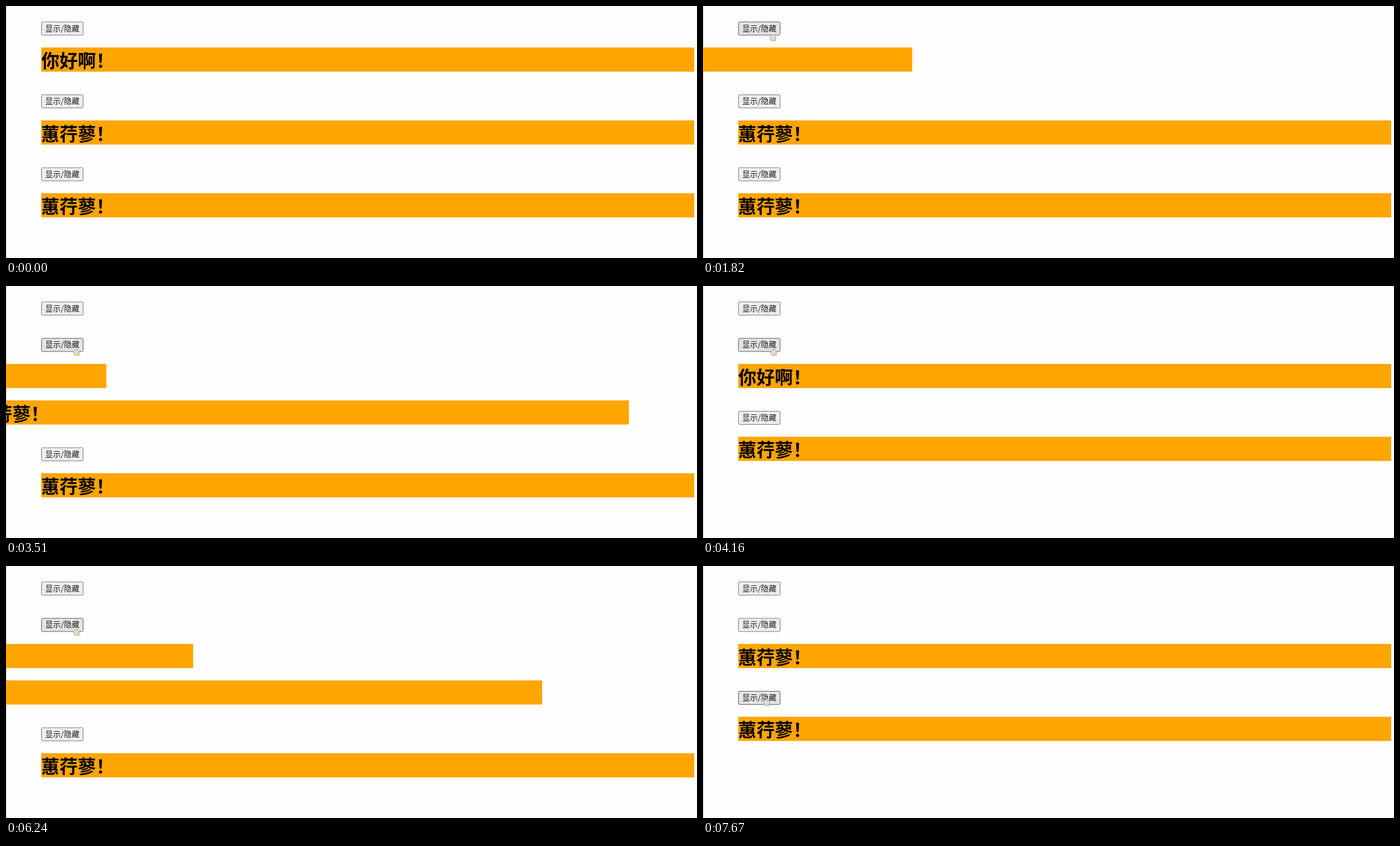
Animation of 1000x365 px, one loop 8 s. Source, as an HTML page:

```html
<!DOCTYPE html>
<html lang="zh-CN">
<head>
<meta charset="utf-8">
<title>显示/隐藏</title>
<style>
  html, body { margin: 0; width: 100%; height: 100%; overflow: hidden; background: #fefefe; }
  #stage {
    position: relative; width: 1000px; height: 365px; overflow: hidden;
    font-family: "Noto Sans CJK SC", "Noto Sans CJK", "Noto Sans CJK JP", sans-serif;
    color: #000;
  }
  #stage > * { position: absolute; left: 0; top: 0; box-sizing: border-box; }
  .button {
    width: 61px; height: 19.5px; border: 1px solid #8a8a8a; border-radius: 2px;
    background: #efefef; color: #1c1c1c; font-size: 11.3px; line-height: 17px;
    text-align: center; white-space: nowrap;
  }
  .button.hover { background: #e5e5e5; border-color: #707070; }
  .bar {
    width: 945.3px; height: 35.4px; background: #ffa500;
    font-size: 26.4px; font-weight: 700; line-height: 35px; white-space: nowrap;
  }
  #edge { width: 1px; height: 365px; background: #d9d9d9; }
  #cursor { width: 15px; height: 16px; }
</style>
</head>
<body>
<div id="stage">
  <div id="edge"></div>
  <svg id="cursor" viewBox="0 0 15 16">
    <path d="M.5 5V.5H5" fill="none" stroke="#e3c98c"/>
    <ellipse cx="8" cy="9" rx="4.5" ry="4.5" fill="#dedbd6" stroke="#b5aa98"/>
    <path d="M8 13h5" stroke="#e6bd62" stroke-width="1.5"/>
  </svg>
</div>
<script>
const LOOP = 8000, TICK = 130, SLIDE = 487.5;
const LEFT = 51, WIDTH = 945.3, ROW = 52.77;
const HELLO = '你好啊！', NAME = '蕙荇蓼！';

// time, x, y of the pointer
const PATH = [
  [130, 330, 365], [1040, 93, 37], [2340, 93, 37], [2470, 95, 42],
  [3250, 94, 87], [6890, 94, 87], [7670, 84, 189]
];

const stage = document.getElementById('stage');
const cursor = document.getElementById('cursor');

function add(className, text) {
  const node = document.createElement('div');
  node.className = className;
  node.textContent = text;
  stage.insertBefore(node, cursor);
  return node;
}

const groups = [[HELLO], [HELLO, NAME], [NAME]].map(labels => ({
  button: add('button', '显示/隐藏'),
  bars: labels.map(label => add('bar', label))
}));

const clamp = v => Math.min(1, Math.max(0, v));
const progress = (t, start) => clamp((t - start) / SLIDE);
const place = (node, x, y) => { node.style.transform = `translate(${x}px, ${y}px)`; };

function pointerAt(t) {
  let i = 0;
  while (i < PATH.length - 2 && t >= PATH[i + 1][0]) i++;
  const [t0, x0, y0] = PATH[i], [t1, x1, y1] = PATH[i + 1];
  const u = clamp((t - t0) / (t1 - t0));
  const e = u * u * (3 - 2 * u);
  return [x0 + (x1 - x0) * e, y0 + (y1 - y0) * e];
}

// Share of its width that each bar is pushed left; null when it is hidden
function barShifts(t) {
  const first = progress(t, 1462.5);
  const swap = progress(t, 3461.25);
  const back = progress(t, 5866);
  return [
    [first < 1 ? first : null],
    [
      swap > 0 && back < 1 ? (back > 0 ? back : 1 - swap) : null,
      back > 0 ? 1 - back : swap < 1 ? swap : null
    ],
    [0]
  ];
}

function draw(t) {
  const shifts = barShifts(t);
  const [px, py] = pointerAt(t);
  cursor.style.display = t < 260 ? 'none' : '';
  place(cursor, px, py);

  let row = 0;
  groups.forEach(({ button, bars }, g) => {
    const top = 22.6 + ROW * row;
    place(button, LEFT, top);
    const over = t >= 260 && px >= LEFT && px < LEFT + 61 && py >= top && py < top + 20;
    button.classList.toggle('hover', over);
    bars.forEach((bar, b) => {
      const shift = shifts[g][b];
      bar.style.display = shift === null ? 'none' : '';
      if (shift === null) return;
      place(bar, LEFT - WIDTH * shift, 60.1 + ROW * row);
      row++;
    });
    row++;
  });
}

const begin = performance.now();
function frame() {
  const t = (performance.now() - begin) % LOOP;
  draw(Math.floor((t + 1) / TICK) * TICK);
  requestAnimationFrame(frame);
}
frame();
</script>
</body>
</html>
```
